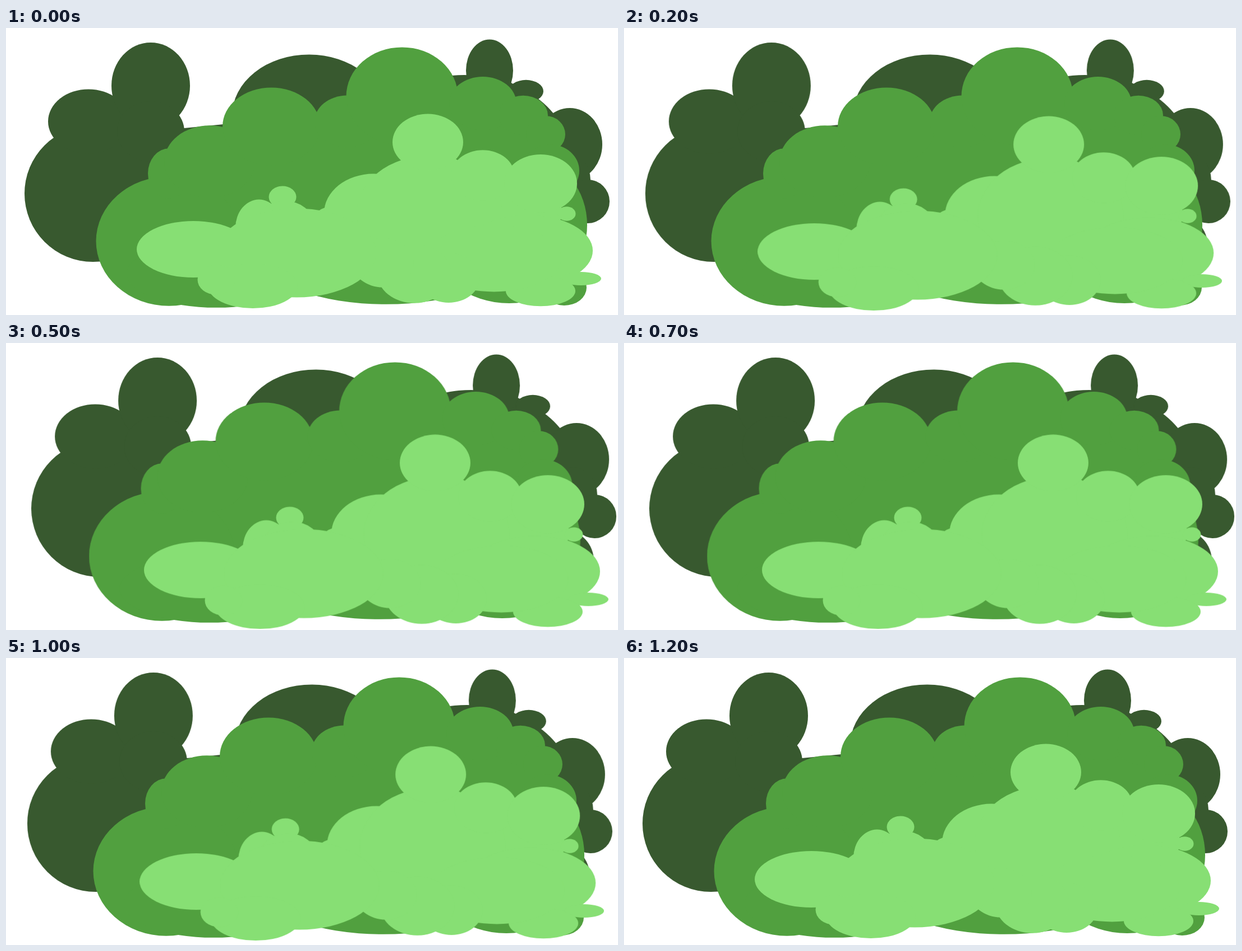
An HTML page that plays this animation: 1091 by 513 pixels, repeating every 1300 ms.

```html
<!DOCTYPE html>
<html lang="en">
<head>
<meta charset="utf-8">
<title>Swaying bush</title>
<style>
  html, body { margin: 0; width: 100%; height: 100%; overflow: hidden; background: #fff; }
  svg { display: block; width: 100%; height: 100%; }
</style>
</head>
<body>
<svg id="stage" viewBox="0 0 1091 513"></svg>
<script>
const stage = document.getElementById('stage');

function add(parent, tag, attrs) {
  const el = document.createElementNS('http://www.w3.org/2000/svg', tag);
  for (const name in attrs) el.setAttribute(name, attrs[name]);
  return parent.appendChild(el);
}

// Six steps out, six steps back, then one step of rest
function sway(el, dx, dy) {
  const rest = 'translate(0px, 0px)';
  const easing = 'steps(6, end)';
  el.animate([
    { offset: 0, transform: rest, easing },
    { offset: 6 / 13, transform: `translate(${dx}px, ${dy}px)`, easing },
    { offset: 12 / 13, transform: rest },
    { offset: 1, transform: rest }
  ], { duration: 1300, iterations: Infinity });
}

// Lobes run clockwise: centre x, y, half width and, where it is not usual, the
// height to width ratio. Joining their centres fills the inside of the bush.
function bush(fill, dx, dy, lobes) {
  const group = add(stage, 'g', { fill });
  add(group, 'polygon', { points: lobes.map(([x, y]) => x + ',' + y).join(' ') });
  for (const [cx, cy, rx, ratio = 0.8] of lobes) {
    add(group, 'ellipse', { cx, cy, rx, ry: rx * ratio });
  }
  sway(group, dx, dy);
}

bush('#38592f', 14.5, 0, [
  [155, 296, 122, 1], [147, 167, 72], [258, 103, 70, 1.1], [258, 185, 60, 0.9],
  [540, 157, 137], [817, 236, 190], [862, 76, 42, 1.32], [927, 113, 31, 0.65],
  [1005, 208, 58, 1.12], [999, 272, 43, 1.16], [1037, 310, 39, 1], [984, 390, 52, 1.06]
]);

bush('#51a03f', -15, 0, [
  [290.5, 381, 130, 0.89], [291, 260, 38, 1.18], [363, 239, 81], [473, 176, 87],
  [608, 167, 58], [706, 122, 99.5, 0.88], [850, 135, 60], [922, 156, 44],
  [962, 190, 35, 0.94], [970, 255, 52, 0.9], [940, 352, 96, 1.2], [995, 464, 40],
  [897, 384, 135], [677, 408, 220, 0.39], [375, 439, 160, 0.38]
]);

bush('#87df74', 15.5, 12.3, [
  [334, 395.5, 101, 0.5], [451, 357, 42, 1.2], [493, 302, 24.5], [497, 350, 51],
  [590, 357, 50], [655, 331, 88], [755, 332, 130], [752, 204, 63],
  [850, 263.5, 56.5], [953, 278, 65], [999.5, 332, 16], [930, 398, 116, 0.55],
  [1025, 448, 36, 0.33], [953, 470, 62, 0.44], [870, 411.5, 120, 0.5], [789, 446.5, 55.5],
  [728, 439, 66], [672, 419.5, 55], [518, 402, 142, 0.56], [440, 461, 80, 0.5],
  [375, 450, 33.5]
]);
</script>
</body>
</html>
```
